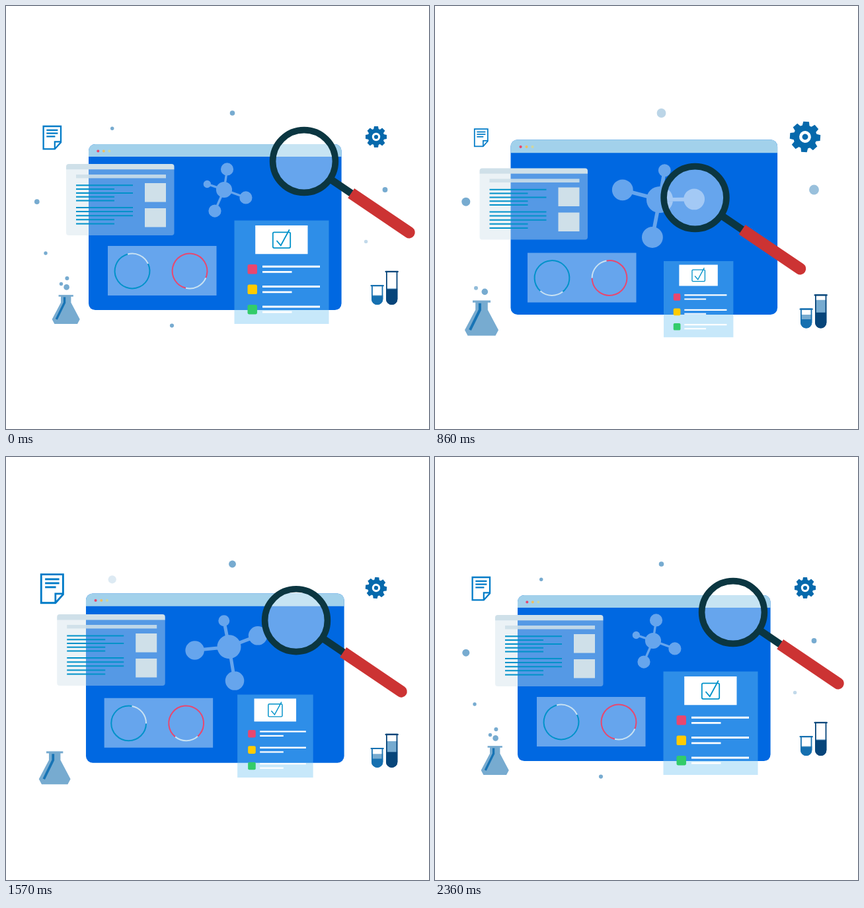
Recreate the animation shown at these times as an HTML page with a canvas. Size 640 by 640 pixels, loop 2.43 s.

```html
<!DOCTYPE html>
<html lang="en">
<head>
<meta charset="utf-8">
<title>Research dashboard</title>
<style>
html, body { margin: 0; width: 100%; height: 100%; overflow: hidden; background: #fff; }
canvas { display: block; width: 100vw; height: 100vh; }
</style>
</head>
<body>
<canvas id="stage"></canvas>
<script>
const SIZE = 640, LOOP = 2430, STEPS = 34, CYCLE = 33;
const C = {
  blue: '#0068e1', head: '#a2d1eb', pale: '#cfe0e9', teal: '#0092c9', pink: '#e8476f',
  yellow: '#ffcb00', green: '#33cc6a', mist: '#77abd0', gear: '#0669ac', doc: '#007bc7',
  tube: '#1670b0', navy: '#07457a', dark: '#0b3641', red: '#cc3333', arc: '#c9e2f2'
};

const canvas = document.getElementById('stage');
const ctx = canvas.getContext('2d');

// Smooth monotone curve through six key values that closes on itself.
function track(...vals) {
  const late = vals[5] === vals[0] && vals.length === 7 ? vals.pop() : 26;
  const keys = [0, 4, 8, 12, 18, late, CYCLE], n = 6;
  vals.push(vals[0]);
  const slope = keys.slice(1).map((k, i) => (vals[i + 1] - vals[i]) / (k - keys[i]));
  const tan = keys.map((_, i) => {
    const a = slope[(i + n - 1) % n], b = slope[i % n];
    return a * b <= 0 ? 0 : 2 * a * b / (a + b);
  });
  return k => {
    let i = 0;
    while (i < n - 1 && k > keys[i + 1]) i++;
    const h = keys[i + 1] - keys[i], u = (k - keys[i]) / h, v = 1 - u;
    return vals[i] * (1 + 2 * u) * v * v + tan[i] * h * u * v * v
      + vals[i + 1] * u * u * (3 - 2 * u) - tan[i + 1] * h * u * u * v;
  };
}

const win = track(1, 1.038, 1.06, 1.055, 1.034, 1.0105);
const textX = track(91, 81, 70.5, 67.5, 72, 83);
const textY = track(239, 247.5, 252, 245.5, 241, 236.5);
const chartX = track(154, 144, 139, 140, 144.5, 152);
const chartY = track(363, 367.5, 376.3, 373.5, 367, 363.6);
const ringTurn = track(0, -78, -242, -203, -46, 62);
const listX = track(345.5, 351, 346, 346, 351, 348.5);
const listY = track(324.5, 363, 387, 386, 375.3, 342.5);
const listScale = track(1, .79, .737, .737, .737, .899);
const molX = track(330, 329.5, 338, 340, 339.5, 334.5);
const molY = track(278, 286, 291.5, 293, 292, 281.5);
const molScale = track(1, 1.36, 1.62, 1.66, 1.65, 1.25);
const molTurn = track(0, 45, 74, 81, 79, 33);
// The lens is back at rest by step 24.
const lensX = track(451, 408, 394.3, 393.5, 401, 451, 24);
const lensY = track(235, 256, 285, 290, 284.7, 235, 24);
const docScale = track(1, .91, .83, .76, 1.19, 1.28);
const gearSize = track(16, 18.8, 23, 23, 16.4, 16);
const gearTurn = track(0, 12, 16, 4, 10, 0);
const flaskX = track(90.7, 72.3, 70.5, 70.5, 70.5, 79.5);
const flaskY = track(481, 494.8, 498.7, 498.7, 498.7, 489.3);
const flaskScale = track(.825, .9, 1, 1, 1, .86);
const tubeDrop = track(0, 18.5, 32, 35.5, 27, 9);
const foamA = track(1, 3, 5, 7, 7.5, 6);
const foamB = track(1, 11.5, 17, 19, 19, 11);

const rad = deg => deg * Math.PI / 180;
const mix = (a, b, u) => a + (b - a) * u;

function at(x, y, s, deg, draw) {
  ctx.save();
  ctx.translate(x, y);
  ctx.rotate(rad(deg));
  ctx.scale(s, s);
  draw();
  ctx.restore();
}

function box(x, y, w, h, fill, r = 0) {
  ctx.beginPath();
  ctx.roundRect(x, y, w, h, r);
  ctx.fillStyle = fill;
  ctx.fill();
}

function disc(x, y, r, fill) {
  ctx.beginPath();
  ctx.arc(x, y, r, 0, 2 * Math.PI);
  ctx.fillStyle = fill;
  ctx.fill();
}

function poly(pts, close) {
  ctx.beginPath();
  pts.forEach(([x, y]) => ctx.lineTo(x, y));
  if (close) ctx.closePath();
}

function line(pts, color, width, close) {
  poly(pts, close);
  ctx.strokeStyle = color;
  ctx.lineWidth = width;
  ctx.stroke();
}

function arc(x, y, r, from, to, color, width) {
  ctx.beginPath();
  ctx.arc(x, y, r, rad(from), rad(to));
  ctx.strokeStyle = color;
  ctx.lineWidth = width;
  ctx.stroke();
}

function drawWindow(k) {
  at(316.3, 334.6, win(k), 0, () => {
    box(-191.3, -125.5, 382.6, 251, C.blue, 10);
    box(-191.3, -125.5, 382.6, 19, C.head, [10, 10, 0, 0]);
    [C.pink, '#f0c060', '#cfd6a0'].forEach((c, i) => disc(-177 + i * 8.5, -115.2, 2, c));
  });
}

function drawMolecule(k) {
  const s = molScale(k), turn = molTurn(k), cx = molX(k), cy = molY(k);
  const nodes = [[198.4, 27, 5.7], [278.3, 31.4, 9.6], [20, 35, 9.6], [113.6, 35, 9.6]];
  // One path, so the overlaps stay even.
  const shape = new Path2D();
  const ball = (x, y, r) => { shape.moveTo(x + r, y); shape.arc(x, y, r, 0, 2 * Math.PI); };
  ball(cx, cy, 12.1 * s);
  for (const [deg, d, r] of nodes) {
    const a = rad(deg + turn), c = Math.cos(a), n = Math.sin(a), w = 1.7 * s, l = d * s;
    const x = cx + l * c, y = cy + l * n;
    shape.moveTo(cx + w * n, cy - w * c);
    shape.lineTo(x + w * n, y - w * c);
    shape.lineTo(x - w * n, y + w * c);
    shape.lineTo(cx - w * n, cy + w * c);
    shape.closePath();
    ball(x, y, r * s);
  }
  ctx.fillStyle = 'rgba(255,255,255,.4)';
  ctx.fill(shape);
}

function drawText(k) {
  at(textX(k), textY(k), 1, 0, () => {
    box(0, 8, 163.5, 100, 'rgba(207,224,233,.41)', [0, 0, 4, 4]);
    box(0, 0, 163.5, 8.3, C.pale, [4, 4, 0, 0]);
    box(15, 16, 136, 5.5, 'rgba(207,224,233,.88)');
    [[32.3, 'LSLSS'], [66, 'LLLSS']].forEach(([top, widths], j) => {
      box(119, 29 + j * 38, 32, 28.5, C.pale);
      [...widths].forEach((w, i) => {
        const y = top + i * (j ? 6.1 : 5.8);
        line([[15, y], [w === 'L' ? 101 : 73, y]], C.teal, 2);
      });
    });
  });
}

function drawCharts(k) {
  const turn = ringTurn(k);
  at(chartX(k), chartY(k), 1, 0, () => {
    box(0, 0, 164.5, 75, 'rgba(255,255,255,.4)');
    for (const [x, mid, color] of [[37, -65, C.teal], [124, 63, C.pink]]) {
      const a = mid + turn;
      arc(x, 38, 26.4, a + 40, a + 320, color, 2);
      arc(x, 38, 26.4, a - 40, a + 40, C.arc, 2);
    }
  });
}

function drawList(k) {
  at(listX(k), listY(k), listScale(k), 0, () => {
    box(0, 0, 143, 156.5, 'rgba(116,197,243,.4)');
    box(31.7, 7.5, 79.3, 43.3, '#fff');
    ctx.beginPath();
    ctx.roundRect(58.3, 17.8, 26.4, 23.8, 2);
    ctx.strokeStyle = C.teal;
    ctx.lineWidth = 1.8;
    ctx.stroke();
    line([[64, 30.5], [70.3, 37.8], [83.3, 13.8]], C.teal, 1.8);
    [C.pink, C.yellow, C.green].forEach((c, i) => {
      const y = 66.6 + i * 30.4;
      box(20, y, 14.5, 14.5, c, 2.6);
      line([[42.5, y + 3.1], [129.5, y + 3.1]], '#fff', 3);
      line([[42.5, y + 11.3], [87, y + 11.3]], '#fff', 2.8);
    });
  });
}

function drawLens(k) {
  at(lensX(k), lensY(k), 1, 0, () => {
    disc(0, 0, 45, 'rgba(255,255,255,.4)');
    at(0, 0, 1, 34.1, () => {
      box(47, -5.5, 41, 11, C.dark);
      box(86, -8.8, 114.8, 17.6, C.red, [0, 8.8, 8.8, 0]);
    });
    arc(0, 0, 47.4, 0, 360, C.dark, 9.6);
  });
}

function drawDoc(k) {
  at(69.8, 199.2, docScale(k), 0, () => {
    line([[-13.2, -17.2], [13.2, -17.2], [13.2, 7], [4, 17.2], [-13.2, 17.2]], C.doc, 2.3, true);
    line([[13.2, 6.2], [4, 6.2], [4, 17.2]], C.doc, 2.2);
    for (let i = 0; i < 3; i++) {
      const y = -11.4 + i * 4.8;
      line([[-8.5, y], [i < 2 ? 8.6 : 4.6, y]], C.doc, 2.3);
    }
  });
}

function drawGear(k) {
  at(560, 198, gearSize(k) / 16, gearTurn(k), () => {
    disc(0, 0, 12.4, C.gear);
    for (let i = 0; i < 8; i++) {
      ctx.rotate(Math.PI / 4);
      poly([[-3.9, -11], [-3, -16], [3, -16], [3.9, -11]], true);
      ctx.fill();
    }
    disc(0, 0, 6.2, '#fff');
    disc(0, 0, 3.1, C.gear);
  });
}

function drawFlask(k) {
  at(flaskX(k), flaskY(k), flaskScale(k), 0, () => {
    const half = [[9.3, -51], [9.3, -39], [25.5, -8.5], [21, 0]];
    box(-13.5, -53.2, 27, 3.2, C.mist);
    poly([...half, ...half.map(([x, y]) => [-x, y]).reverse()], true);
    ctx.fill();
    line([[-2.6, -49], [-2.6, -39], [-17.5, -8.5]], '#1874b5', 4);
  });
}

function drawTube(x, y, h, level, foam, color) {
  at(x, y, 1, 0, () => {
    ctx.save();
    ctx.beginPath();
    ctx.roundRect(-8.7, 1, 17.4, h - 1, [0, 0, 8.7, 8.7]);
    ctx.clip();
    box(-9, level - foam, 18, foam + .5, C.mist);
    box(-9, level, 18, h, color);
    ctx.restore();
    ctx.beginPath();
    ctx.roundRect(-7.8, 1, 15.6, h - 1.9, [0, 0, 7.8, 7.8]);
    ctx.strokeStyle = color;
    ctx.lineWidth = 1.8;
    ctx.stroke();
    box(-10.2, 0, 20.4, 2.2, color, 1);
  });
}

function drawDots(k) {
  const clock = from => k < from ? k + CYCLE : k;
  const spot = (x, y, r, from, to, max, fade) => {
    const t = clock(from);
    if (t >= to) return;
    ctx.globalAlpha = max * Math.min(1, (t - from) / fade, (to - t) / fade);
    disc(x, y, r, C.mist);
    ctx.globalAlpha = 1;
  };
  // Radius goes r0, r1, r2 at the steps from, mid, to.
  const dot = (x, y, from, mid, to, r0, r1, r2, max = 1) => {
    const t = clock(from);
    const r = t < mid ? mix(r0, r1, (t - from) / (mid - from)) : mix(r1, r2, (t - mid) / (to - mid));
    spot(x, y, Math.max(r, 0), from, to, max, 4);
  };
  const bubble = (x0, y0, x1, y1, from, to, r) => {
    const u = (clock(from) - from) / (to - from);
    spot(mix(x0, x1, u), mix(y0, y1, u), r, from, to, 1, 2.5);
  };

  dot(342.5, 162, 10, 33, 39, 7.2, 3.8, 3.5);
  dot(160.7, 185.3, 21, 33, 44, 6.4, 2.7, 5.8);
  dot(573.5, 278, 22, 33, 48, 9.3, 3.9, 8.3);
  dot(60, 374, 22, 33, 41, 5, 2.7, 7.2);
  dot(251, 483.6, 29, 37, 45, 2, 4.1, 1.5);
  dot(544.6, 356.4, 22, 33, 37, 4.8, 2.7, 2.4, .45);
  dot(46.8, 296.2, -4, 8, 19, 2.95, 5.6, 8);
  dot(46.8, 296.2, 14, 18, 22, 3.8, 3.8, 3);
  if (k > 28) disc(46.8, 296.2, 5.5 + (CYCLE - k) * .6, C.mist);

  bubble(87, 430, 96, 400, 27, 37, 3);
  bubble(82, 432, 85, 409, 28, 38, 2.7);
  bubble(83, 434, 98, 419, 25.6, 38.5, 4.3);
  if (k < 15) bubble(75.3, 433, 75.3, 432, 6, 16, 4.8);
  bubble(74, 427, 71, 404, 15, 21, 3.6);
  bubble(62, 432, 62, 419, 10, 15, 3);
}

function draw(k) {
  const px = Math.round(innerWidth * devicePixelRatio), py = Math.round(innerHeight * devicePixelRatio);
  if (canvas.width !== px || canvas.height !== py) {
    canvas.width = px;
    canvas.height = py;
  }
  ctx.setTransform(px / SIZE, 0, 0, py / SIZE, 0, 0);
  ctx.fillStyle = '#fff';
  ctx.fillRect(0, 0, SIZE, SIZE);
  drawDots(k);
  drawWindow(k);
  drawMolecule(k);
  drawText(k);
  drawCharts(k);
  drawList(k);
  drawLens(k);
  drawDoc(k);
  drawGear(k);
  drawFlask(k);
  const drop = tubeDrop(k);
  drawTube(561.7, 422 + drop, 30, 16.5, foamA(k), C.tube);
  drawTube(583.7, 400.8 + drop, 51.2, 27.5, foamB(k), C.navy);
}

const start = performance.now();
function tick() {
  const t = (performance.now() - start) % LOOP;
  draw(Math.min(STEPS - 1, Math.floor((t + 4) / LOOP * STEPS)));
  requestAnimationFrame(tick);
}
tick();
</script>
</body>
</html>
```
